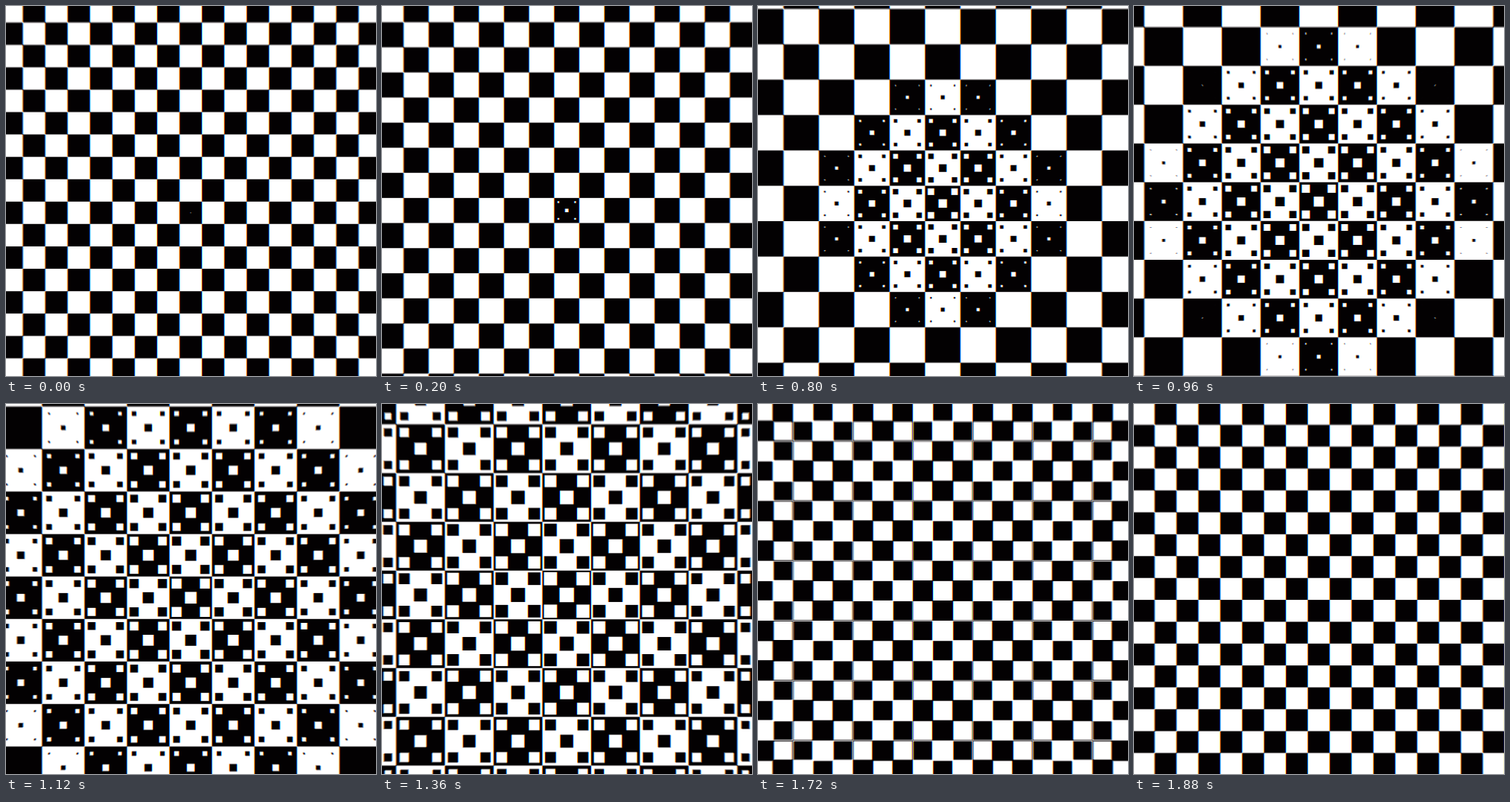
These frames come from a looping animation (497 by 497 pixels, 1920 ms). An HTML page with a canvas:

```html
<!DOCTYPE html>
<html lang="en">
<head>
<meta charset="utf-8">
<title>Endless checkerboard</title>
<style>
  html, body { margin: 0; width: 100%; height: 100%; overflow: hidden; background: #030102; }
  canvas { display: block; }
</style>
</head>
<body>
<canvas id="stage" width="497" height="497"></canvas>
<script>
const SIZE = 497, LOOP = 1920, STEP = 40;
const CELL = 30.07, CENTER_X = 248.1, START_Y = 277.8;
const FOCUS_Y = 300, FRINGE = 0.6, BLUR_STEP = 0.002;
const SPLIT_END = 0.95;
const ctx = document.getElementById('stage').getContext('2d');

// Share of a cell's own split that is done, spreading outwards from the middle.
function splitProgress(phase, distance) {
  const start = 0.15 * distance - 0.0075 * distance ** 2 - 0.002;
  return Math.min(1, Math.max(0, (phase - start) / (SPLIT_END - start)));
}

function addSquare(path, x, y, side) {
  path.rect(x - side / 2, y - side / 2, side, side);
}

// White area under the even-odd rule: inner squares invert their cell.
function boardPath(phase) {
  const path = new Path2D();
  const cell = CELL * 3 ** phase, third = cell / 3;
  const centerY = START_Y - CELL * phase;
  const reach = Math.ceil(SIZE / 2 / cell) + 2;

  for (let row = -reach; row <= reach; row++) {
    for (let col = -reach; col <= reach; col++) {
      const x = CENTER_X + col * cell, y = centerY + row * cell;
      if ((row + col) % 2) addSquare(path, x, y, cell);

      const progress = splitProgress(phase, Math.hypot(row, col));
      if (!progress) continue;
      addSquare(path, x, y, third * progress ** 0.4);
      const corner = third * progress ** 0.72;
      for (const dx of [-third, third])
        for (const dy of [-third, third])
          addSquare(path, x + dx, y + dy, corner);
    }
  }
  return path;
}

function draw(time) {
  const phase = Math.floor((time % LOOP) / STEP) * STEP / LOOP;
  const board = boardPath(phase);
  ctx.globalCompositeOperation = 'source-over';
  ctx.fillStyle = '#030102';
  ctx.fillRect(0, 0, SIZE, SIZE);

  // Five faint zoomed layers per channel add up to a lens blur;
  // the sideways channel shift tints vertical edges.
  ctx.globalCompositeOperation = 'lighter';
  ['#300', '#030', '#003'].forEach((color, i) => {
    ctx.fillStyle = color;
    for (let layer = -2; layer <= 2; layer++) {
      const zoom = 1 + layer * BLUR_STEP;
      const shiftX = CENTER_X * (1 - zoom) + (1 - i) * FRINGE;
      ctx.setTransform(zoom, 0, 0, zoom, shiftX, FOCUS_Y * (1 - zoom));
      ctx.fill(board, 'evenodd');
    }
  });
  ctx.setTransform(1, 0, 0, 1, 0, 0);
}

function tick() {
  draw(performance.now());
  requestAnimationFrame(tick);
}
tick();
</script>
</body>
</html>
```
